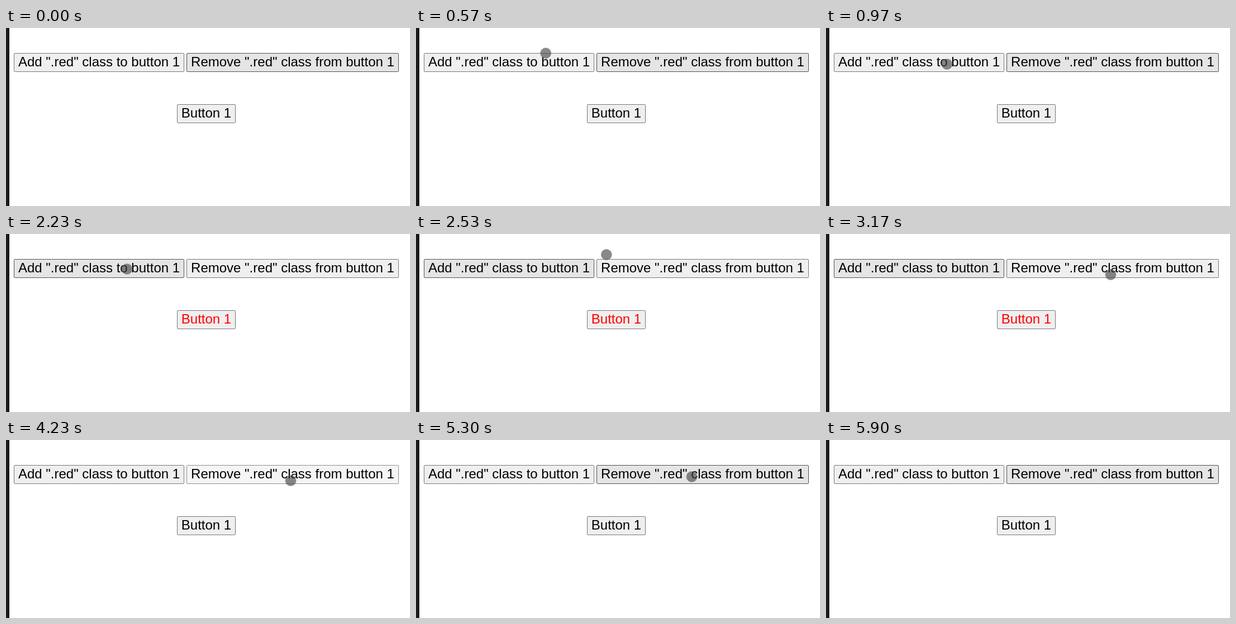
An HTML page for the animation above (6830 ms loop, 723 px wide and 320 px high).

```html
<!DOCTYPE html>
<html lang="en">
<head>
<meta charset="utf-8">
<title>Toggle a class on a button</title>
<style>
  html, body { margin: 0; width: 100%; height: 100%; overflow: hidden; background: #fff; }
  svg { display: block; width: 100%; height: 100%; }
  text { font: 24px "Liberation Sans", Arial, sans-serif; text-anchor: middle; white-space: pre; }
</style>
</head>
<body>
<svg id="stage" viewBox="0 0 723 320">
  <rect width="723" height="320" fill="#fff"/>
  <rect width="6" height="320" fill="#1b1b1c"/>
</svg>
<script>
const LOOP = 6830;
const TICK = 1000 / 30;
const ADD_AT = 1230, REMOVE_AT = 4230, PRESS_TIME = 140;
const stage = document.getElementById('stage');

// fill and border of each button state
const looks = {
  rest: ['#efefef', '#767676'],
  focused: ['#e5e5e5', '#4f4f4f'],
  pressed: ['#f5f5f5', '#8d8d8d']
};

function make(tag, attrs) {
  const node = document.createElementNS('http://www.w3.org/2000/svg', tag);
  for (const key in attrs) node.setAttribute(key, attrs[key]);
  return stage.appendChild(node);
}

function makeButton(x, y, width, caption) {
  const box = make('rect', { x: x + .5, y: y + .5, width: width - 1, height: 33, rx: 1.6 });
  const label = make('text', { x: x + width / 2, y: y + 24 });
  label.textContent = caption;
  return {
    look(name) {
      box.setAttribute('fill', looks[name][0]);
      box.setAttribute('stroke', looks[name][1]);
    },
    color(value) { label.setAttribute('fill', value); }
  };
}

const addButton = makeButton(14, 45, 305, 'Add ".red" class to button 1');
const removeButton = makeButton(323, 45, 380, 'Remove ".red" class from button 1');
const subject = makeButton(306, 137, 105, 'Button 1');
subject.look('rest');
const pointer = make('circle', {
  r: 9.6, fill: '#404040', 'fill-opacity': .62, stroke: '#808080', 'stroke-opacity': .5, 'stroke-width': .8
});

// the pointer glides in, arcs across and leaves, each along a quadratic curve
const moves = [
  { start: 366, end: 966, from: [245, -3], via: [237, 52], to: [216.5, 65],
    ease: u => 1 - (1 - u) ** 2 },
  { start: 2233, end: 3166, from: [216.5, 63], via: [453, -1.5], to: [509.5, 73],
    ease: u => { const w = u ** .9; return w * w * (3 - 2 * w); } },
  { start: 5300, end: 5880, from: [493.5, 66], via: [300, 38], to: [100, -3],
    ease: u => u ** 1.2 }
];

function placePointer(t) {
  const move = moves.filter(m => m.start <= t).pop();
  const shown = move && t < moves[moves.length - 1].end;
  pointer.setAttribute('visibility', shown ? 'visible' : 'hidden');
  if (!shown) return;
  const s = move.ease(Math.min(1, (t - move.start) / (move.end - move.start)));
  const [x, y] = move.from.map((a, i) =>
    (1 - s) ** 2 * a + 2 * s * (1 - s) * move.via[i] + s * s * move.to[i]);
  pointer.setAttribute('cx', x);
  pointer.setAttribute('cy', y);
}

function draw(t) {
  const red = t >= ADD_AT && t < REMOVE_AT;
  const sincePress = t - (red ? ADD_AT : REMOVE_AT);
  const active = sincePress >= 0 && sincePress < PRESS_TIME ? 'pressed' : 'focused';
  addButton.look(red ? active : 'rest');
  removeButton.look(red ? 'rest' : active);
  subject.color(red ? '#f00' : '#000');
  placePointer(Math.floor((t + 4) / TICK) * TICK);
}

const start = performance.now();
function frame() {
  draw((performance.now() - start) % LOOP);
  requestAnimationFrame(frame);
}
frame();
</script>
</body>
</html>
```
